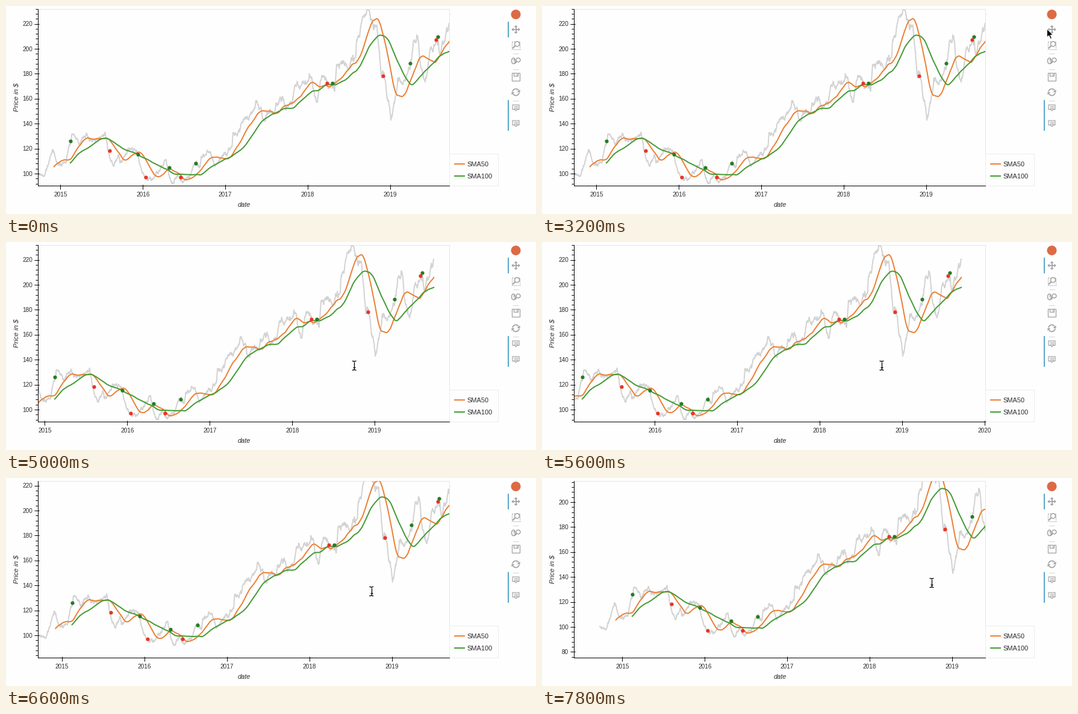
A matplotlib script for the animation above (8000 ms loop, 880 by 345 pixels).

```python
import numpy as np
import matplotlib.pyplot as plt
from matplotlib.animation import FuncAnimation
from matplotlib.collections import LineCollection
from matplotlib.patches import Arc, Circle, Ellipse, Polygon, Rectangle
from matplotlib.transforms import Affine2D

W, H, DPI = 880, 345, 80
PT = 72 / DPI
STEP, FRAMES = 200, 40
LEFT, RIGHT, TOP, BOTTOM = 52.5, 735.5, 4.5, 297.5
MONTH_W, UNIT_H = 11.408, 2.0708      # pixels per month and per dollar
X0, Y0 = 90.3, 485.1                  # January 2015 and zero dollars
GRAY, BLUE, TEXT = "#a3a3a3", "#57a9c9", "#2c2c2c"
ORANGE, GREEN = "#eb8034", "#449a35"

plt.rcParams["font.family"] = "Liberation Sans"
fig = plt.figure(figsize=(W / DPI, H / DPI), dpi=DPI, facecolor="#fefefe")
ax = fig.add_axes([0, 0, 1, 1])
ax.set(xlim=(0, W), ylim=(H, 0))
ax.axis("off")


def line(xs, ys, color, width=1.0, **kw):
    return ax.plot(xs, ys, color=color, lw=width * PT, scalex=False,
                   scaley=False, **kw)[0]


def shape(patch):
    return ax.add_patch(patch)


def label(x, y, text, size, **kw):
    return ax.text(x, y, text, fontsize=size * PT, color=TEXT, **kw)


# Turning points: months since January 2015, dollars
TURNS = [
    (-3.3, 100), (-2.5, 97.5), (-1.1, 119), (-.5, 107), (.8, 109), (1.7, 132),
    (2.8, 125), (3.8, 131), (4.3, 127), (6.6, 129), (7.1, 116), (7.8, 106),
    (8.5, 114), (9, 110), (10.1, 121), (11.1, 117), (11.6, 107), (12.3, 97),
    (13.3, 94.5), (15.4, 111), (15.9, 97), (16.4, 91), (17.1, 99), (17.9, 93),
    (18.8, 98), (19.5, 109), (20.3, 105), (20.5, 114), (21.8, 117), (22.5, 107),
    (24, 116), (25, 121), (25.1, 130), (27, 143), (28.4, 154), (29.2, 154),
    (29.5, 144), (31, 149), (32, 163), (32.8, 152), (33.8, 157), (34.2, 174),
    (35.1, 170), (36.6, 177), (37.3, 157), (38.2, 180), (39, 168), (39.5, 175),
    (39.9, 164), (40.2, 185), (41.2, 191), (41.8, 185), (43, 192), (43.1, 207),
    (44.1, 226), (45.1, 228), (46, 219), (46.7, 178), (47.1, 180), (48.1, 144),
    (49.1, 172), (50.2, 174), (51.3, 199), (52, 209), (52.4, 188), (53.1, 175),
    (53.9, 197), (55, 209), (55.2, 195), (55.9, 205), (56.6, 222)]
BUYS = [(1.46, 126.3), (11.28, 115.5), (15.8, 104.8), (19.74, 108.2),
        (39.6, 172.4), (50.86, 188.4), (54.9, 209.4)]
SELLS = [(7.12, 118.4), (12.46, 97.1), (17.5, 97.1), (38.8, 172.4),
         (47, 178.2), (54.67, 207)]


def mean(values, n, mode="valid"):
    return np.convolve(values, np.ones(n) / n, mode)


def daily_prices():
    """Trend through the turning points plus short-lived seeded jitter."""
    days = np.linspace(-3.27, 56.6, 1256)
    trend = np.interp(days, *zip(*TURNS))
    shocks = np.random.default_rng(7).normal(0, .6, len(days))
    jitter = np.convolve(shocks, .8 ** np.arange(25))[:len(days)]
    jitter -= mean(jitter, 50, "same")
    return days, np.clip(trend * (1 + .012 * jitter), 90.8, 231.7)


pan = Affine2D()
to_pixels = Affine2D().scale(MONTH_W, -UNIT_H).translate(X0, Y0)
frame_box = shape(Rectangle((LEFT, TOP), RIGHT - LEFT, BOTTOM - TOP,
                            fc="none", ec="#e5e5e5", lw=PT))


def series(xs, ys, color, **kw):
    art = line(xs, ys, color, 2, transform=to_pixels + pan + ax.transData, **kw)
    art.set_clip_path(frame_box)


days, price = daily_prices()
series(days, price, "#d3d3d3", solid_joinstyle="round")
for n, color in ((50, ORANGE), (100, GREEN)):
    series(days[n - 1:], mean(price, n), color)
for dots, color in ((SELLS, "#eb3223"), (BUYS, "#237d23")):
    series(*zip(*dots), color, ls="none", marker="o", ms=6.2 * PT, mew=0)

# Axes and legend
line([LEFT] * 2, [TOP, BOTTOM], "black", zorder=4)
line([LEFT, RIGHT], [BOTTOM] * 2, "black", zorder=4)
ticks = LineCollection([], colors="black", linewidths=PT, zorder=4)
ax.add_collection(ticks, autolim=False)
years = {y: label(0, 316.5, str(y), 10, ha="center") for y in range(2014, 2022)}
prices = {p: label(44, 0, str(p), 10, ha="right") for p in range(60, 261, 20)}
label(395, 333, "date", 11, style="italic", ha="center")
label(18.5, 151, "Price in $", 11.4, style="italic", rotation=90,
      ha="center", va="center")

shape(Rectangle((736, 244.5), 80.5, 53.5, fc="#fefefe", ec="#ececec", lw=PT))
for y, name, color in ((261.5, "SMA50", ORANGE), (281.5, "SMA100", GREEN)):
    line([744, 761.5], [y, y], color, 2, solid_capstyle="butt")
    label(765.5, y + 4, name, 11)


# Toolbar
def icon(*paths, width=1.3):
    for pts in paths:
        line(*zip(*pts), GRAY, width, solid_capstyle="butt",
             solid_joinstyle="miter")


def lens(x, y, r):
    shape(Circle((x, y), r, fc="#fefefe", ec=GRAY, lw=1.5 * PT, zorder=3))
    line([x - r * .7, x - r * 1.7], [y + r * .7, y + r * 1.7], GRAY, 2)


def pan_icon(x, y):
    icon([(x - 5, y), (x + 5, y)], [(x, y - 5), (x, y + 5)], width=1.8)
    head = np.array([(7.3, 0), (4, -3), (4, 3)])
    for a in range(4):
        turn = Affine2D().rotate_deg(90 * a).translate(x, y)
        shape(Polygon(turn.transform(head), fc=GRAY, ec="none"))


def box_zoom_icon(x, y):
    shape(Rectangle((x - 7, y - 6), 13, 13, fc="none", ec=GRAY, lw=PT,
                    ls=(0, (2, 1.5))))
    lens(x + 2, y - 2, 4)


def wheel_icon(x, y):
    shape(Ellipse((x - 4, y), 6, 9.5, fc="none", ec=GRAY, lw=1.5 * PT))
    icon([(x - 4, y - 4), (x - 4, y)])
    lens(x + 4, y - 1.5, 3.4)


def save_icon(x, y):
    shape(Rectangle((x - 6.5, y - 6.5), 13, 13, fc="none", ec=GRAY, lw=1.3 * PT))
    icon([(x - 3.5, y - 6.5), (x - 3.5, y - 1.5), (x + 3.5, y - 1.5),
          (x + 3.5, y - 6.5)], [(x + 1.5, y - 5.5), (x + 1.5, y - 2.5)])


def reset_icon(x, y):
    for a, s in ((190, 1), (10, -1)):
        shape(Arc((x, y), 11, 11, theta1=a, theta2=a + 135, ec=GRAY, lw=1.8 * PT))
        shape(Polygon([(x + 7 * s, y - 4.5 * s), (x + 7 * s, y + .5 * s),
                       (x + 2 * s, y - .5 * s)], fc=GRAY, ec="none"))


def hover_icon(x, y):
    shape(Polygon([(x - 5.5, y - 5), (x + 5.5, y - 5), (x + 5.5, y + 2.5),
                   (x + 2, y + 2.5), (x, y + 5), (x - 2, y + 2.5),
                   (x - 5.5, y + 2.5)], fc="none", ec=GRAY, lw=1.2 * PT,
                  joinstyle="round"))
    for dy in (-3, -1, 1):
        icon([(x - 3.5, y + dy), (x + 3.5, y + dy)], width=.9)


CX = 846.5
shape(Circle((CX, 14), 8, fc="#dd6a45", ec="none"))
TOOLS = (pan_icon, box_zoom_icon, wheel_icon, save_icon, reset_icon,
         hover_icon, hover_icon)
for k, draw in enumerate(TOOLS):
    draw(CX, 39 + 26 * k)
for y in (78.5, 104.5, 156.5):
    line([842, 851], [y, y], "#d8d8d8")
pan_bar = shape(Rectangle((833, 26), 2, 26, fc=BLUE, ec="none"))
shape(Rectangle((833, 156), 2, 51, fc=BLUE, ec="none"))

# Pointers
spot = Affine2D()
arrow = shape(Polygon([(0, 0), (0, 14), (3.2, 11), (5.6, 16.5), (8, 15.5),
                       (5.6, 10.3), (10, 10)], fc="black", ec="white",
                      lw=PT, zorder=6))
serifs = [[(0, 6.3 * s), (1.3 * d, 7.5 * s), (3.5 * d, 7.5 * s)]
          for s in (-1, 1) for d in (-1, 1)]
beam = LineCollection(serifs + [[(0, -6.3), (0, 6.3)], [(-2, 3), (2, 3)]],
                      colors="black", linewidths=1.3 * PT, zorder=6)
ax.add_collection(beam, autolim=False)
for pointer in (arrow, beam):
    pointer.set_transform(spot + ax.transData)

# (ms, x, y): the way to the toolbar and back, then the drag
ENTER, UNPICK, PICK = 600, 2400, 3600
POINTER = [(ENTER, 700, 322), (1200, 772, 225), (1600, 852, 34), (2000, 852, 34),
           (3200, 838.5, 38), (PICK, 842, 38), (4200, 604, 205)]
DRAG = [(4400, 0, 0), (5330, -40, 0), (6200, -40, 0), (6600, 2.7, -17),
        (7800, 43, -31)]


def at(track, t):
    times, xs, ys = zip(*track)
    return np.interp(t, times, xs), np.interp(t, times, ys)


def update(i):
    t = i * STEP
    dx, dy = at(DRAG, t)
    pan.clear().translate(dx, dy)
    segs = []
    for year, text in years.items():
        x = X0 + 12 * (year - 2015) * MONTH_W + dx
        shown = LEFT <= x <= RIGHT + .5
        text.set(x=x, visible=shown)
        if shown:
            segs.append([(x, BOTTOM - 2), (x, BOTTOM + 6)])
    for p in range(60, 261, 4):
        y = Y0 - p * UNIT_H + dy
        shown = TOP <= y <= BOTTOM
        major = p % 20 == 0
        if major:
            prices[p].set(y=y + 3.6, visible=shown)
        if shown:
            out, into = (6, 2) if major else (4, 0)
            segs.append([(LEFT - out, y), (LEFT + into, y)])
    ticks.set_segments(segs)

    x, y = at(POINTER, t)
    spot.clear().translate(x + dx, y + dy)
    in_plot = x <= RIGHT
    arrow.set_visible(t >= ENTER and not in_plot)
    beam.set_visible(t >= ENTER and in_plot)
    pan_bar.set_visible(not UNPICK <= t < PICK)
    return []


anim = FuncAnimation(fig, update, frames=FRAMES, interval=STEP,
                     repeat=True, repeat_delay=0, blit=False)
plt.show()
```
